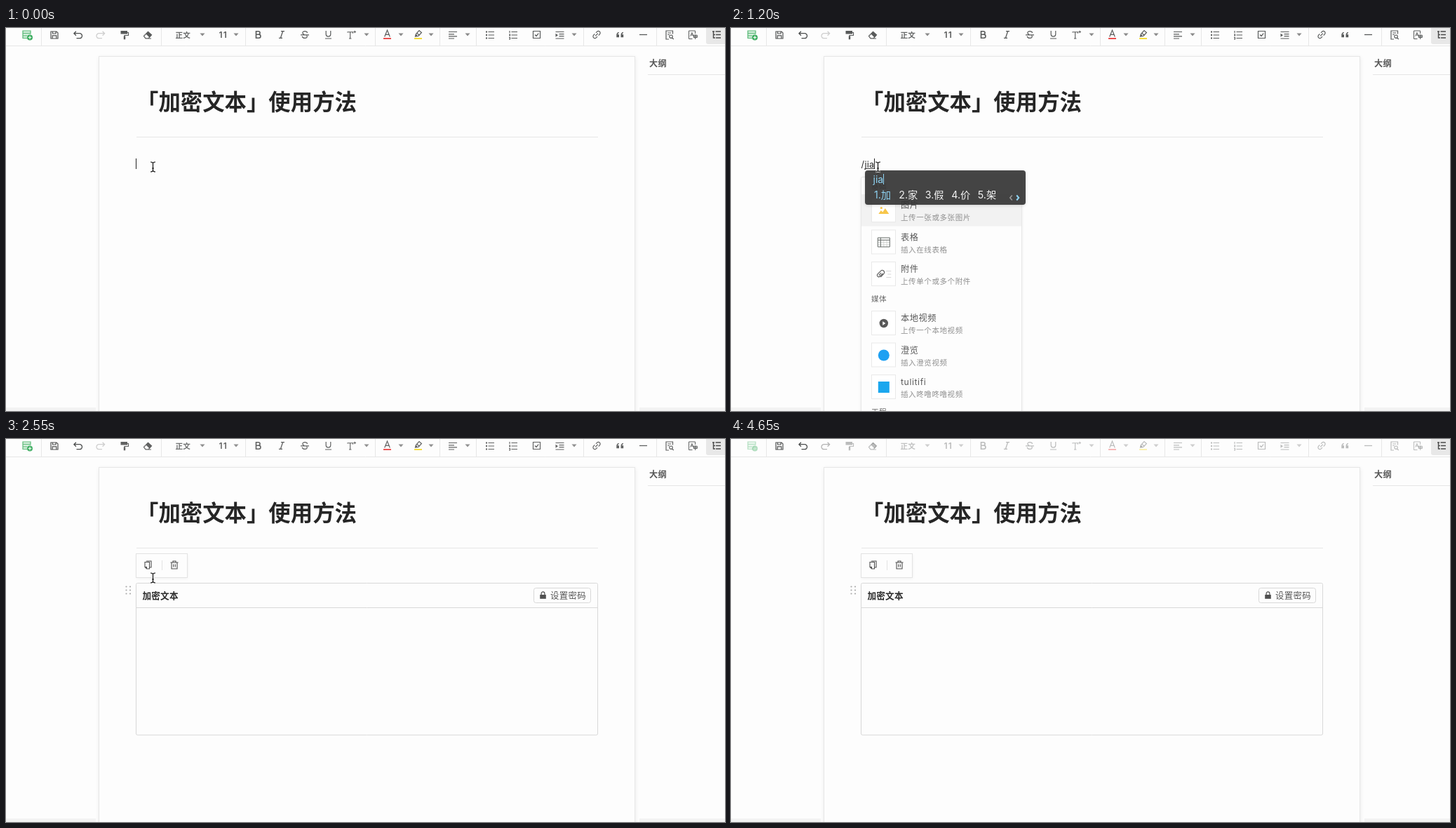
Animation of 1025 by 546 pixels, one loop 5250 ms. Source, as an HTML page with a canvas:

```html
<!DOCTYPE html>
<html lang="zh-CN">
<head>
<meta charset="utf-8">
<style>
html, body { margin: 0; width: 100%; height: 100%; overflow: hidden; background: #fdfdfd; }
canvas { display: block; width: 1025px; height: 546px; }
</style>
</head>
<body>
<canvas id="stage" width="1025" height="546"></canvas>
<script>
const ctx = document.getElementById('stage').getContext('2d');
const LOOP = 5250;
const FONT = 'Inter, "Noto Sans CJK SC", "Noto Sans CJK", sans-serif';
const INK = '#585a5a', PAPER = '#fdfdfd';

// Text placed by its left edge and the vertical centre of its em box.
function text(str, x, yc, size, color = INK, weight = 400, gap = 0) {
  ctx.font = `${weight} ${size}px ${FONT}`;
  ctx.letterSpacing = gap + 'px';
  ctx.fillStyle = color;
  ctx.fillText(str, x, yc + size * 0.38);
}

function line(x1, y1, x2, y2, color, width = 1) {
  ctx.strokeStyle = color;
  ctx.lineWidth = width;
  ctx.beginPath();
  ctx.moveTo(x1, y1);
  ctx.lineTo(x2, y2);
  ctx.stroke();
}

function rect(x, y, w, h, fill, color) {
  ctx.fillStyle = fill;
  ctx.fillRect(x, y, w, h);
  if (color) { ctx.strokeStyle = color; ctx.lineWidth = 1; ctx.strokeRect(x, y, w, h); }
}

function round(x, y, w, h, r, fill, color) {
  ctx.beginPath();
  ctx.roundRect(x, y, w, h, r);
  if (fill) { ctx.fillStyle = fill; ctx.fill(); }
  if (color) { ctx.strokeStyle = color; ctx.lineWidth = 1; ctx.stroke(); }
}

function shadowed(blur, dy, alpha, draw) {
  ctx.save();
  ctx.shadowColor = `rgba(0,0,0,${alpha})`;
  ctx.shadowBlur = blur;
  ctx.shadowOffsetY = dy;
  draw();
  ctx.restore();
}

function icon(x, y, stroke, fill = '', color = INK, width = 1.2) {
  ctx.save();
  ctx.translate(x, y);
  ctx.strokeStyle = ctx.fillStyle = color;
  ctx.lineWidth = width;
  if (stroke) ctx.stroke(new Path2D(stroke));
  if (fill) ctx.fill(new Path2D(fill));
  ctx.restore();
}

function dot(x, y, r, color) {
  ctx.fillStyle = color;
  ctx.beginPath();
  ctx.arc(x, y, r, 0, Math.PI * 2);
  ctx.fill();
}

function editTools() {
  // insert card
  icon(30, 9.5, 'M5-1v-4.5h-11v10.5h7M-6-2h11M-6 1.5h6', '', '#55b873');
  ctx.globalAlpha *= 0.25;
  rect(24, 4, 11, 10, '#55b873');
  ctx.globalAlpha *= 4;
  dot(34, 13.5, 4, '#3fae62');
  icon(34, 13.5, 'M-2.3 0h4.6M0-2.3v4.6', '', '#fff');

  icon(169, 10, 'M4-3.5h1.5v4h-5.5v2', 'M-5.5-6h9.5v4.5h-9.5zM-1.2 1.5h2.4v4.7h-2.4z');
  icon(202, 10, 'M-5.5 1.5l6-6.2 5 4.6-4.5 5h-4zM0 5h5', 'M-2.5-1.5l3-3.2 5 4.6-3 3.5z');
  text('正文', 241.5, 9.5, 10.6, '#666868', 600, 0.2);
  text('11', 303.5, 9.5, 12, INK, 600, 1.2);
  for (const x of [280, 328, 514, 563, 606, 658, 810])
    icon(x, 9.5, '', 'M-3.5-2h7l-3.5 4z', '#8a8a8a');

  icon(359.5, 9.5, 'M-3-4.7h3.3a2.2 2.2 0 0 1 0 4.5h-3.3zM-3-.2h4a2.4 2.4 0 0 1 0 4.9h-4z', '', INK, 1.6);
  icon(393, 9.5, 'M-1-4.8h5M-4 4.8h5M1.6-4.8l-3.2 9.6', '', INK, 1.3);
  icon(426, 9.5, 'M3.6-2.6c-.5-3-6.8-3-6.8 0c0 1.2 1 1.8 2.4 2.2M2.6 1.2c2 2-.4 4-2.6 3.7c-2 0-3.5-1-3.8-2.6M-6 .4h12');
  icon(459.5, 9, 'M-3.3-5v4.8a3.3 3.3 0 0 0 6.6 0v-4.8M-4.5 6h9');
  icon(491, 10, 'M-4-3.5v-.7h7.5v2M-.3-4v9M-2 5h3.4M4.5-4.5h3.4M6.2-6.2v3.4', '', INK, 1.1);
  icon(543.5, 8, 'M-3.8 4.5l3.8-9.5 3.8 9.5M-2.4 1.4h4.8');
  rect(538, 14, 11, 2, '#ea4f4f');
  icon(587.5, 8, 'M-4 4l1-3.5 4.5-5 3.4 3-4.5 5zM-2-1l3.6 3.3', 'M-4 4l1-3.3 3 3z');
  rect(582, 14, 11, 2, '#f5dc3c');

  icon(637, 10, 'M-6-4.5h12M-6-1.2h8M-6 1.8h12M-6 5h8');
  icon(690, 10, 'M-2.5-4.5h8.5M-2.5 0h8.5M-2.5 4.5h8.5', 'M-6-5.5h2v2h-2zM-6-1h2v2h-2zM-6 3.5h2v2h-2z');
  icon(723, 10, 'M-2.5-4.5h8.5M-2.5 0h8.5M-2.5 4.5h8.5M-5-6v3M-6-1h1.5v2h-1.5M-6 3.5h1.5v2.5h-1.5', '', INK, 1.1);
  icon(756.5, 9.5, 'M-5-5h10v10h-10zM-2.5 0l2 2 3.2-3.8');
  icon(789.5, 10, 'M-6-4.5h12M-1-1.3h7M-1 1.7h7M-6 5h12', 'M-6-2.3l3.5 2.5-3.5 2.5z');

  ctx.save();
  ctx.translate(842, 9.5);
  ctx.rotate(-Math.PI / 4);
  icon(0, 0, 'M-1.2-2.6h-2.3a2.6 2.6 0 0 0 0 5.2h2.3M1.2-2.6h2.3a2.6 2.6 0 0 1 0 5.2h-2.3M-2.6 0h5.2');
  ctx.restore();
  const quote = 'v-1c0-2.2 1.2-3.8 3.4-4.2v1.5c-1 .3-1.6 1-1.6 1.9h1.9v4h-3.7z';
  icon(875.5, 9.5, '', 'M-5.2 1.5' + quote + 'M1 1.5' + quote);
  icon(908.5, 9.5, 'M-5.5 0h11', '', INK, 1.3);
  icon(946, 10, 'M4.5-1.5v-4.5h-9.5v12h4M-2.7-3h5M-2.7-.5h2.5M4.2 2.2a2.2 2.2 0 1 1-4.4 0a2.2 2.2 0 1 1 4.4 0M3.7 4l2 2');
  icon(979, 10, 'M3.5-2v-4h-9v11.5h5M-3.3 1.5l2.2-5 2 5M-2.6 0h3M1 2h5.5M3.7-.5v6.5M1.3.2h5v3.4h-5z', '', INK, 1);
}

function toolbar(t) {
  line(0, 25.5, 1025, 25.5, '#e7e7e7');
  for (const x of [50.5, 221.5, 341.5, 526.5, 618.5, 670.5, 823.5, 927.5])
    line(x, 0, x, 25, '#e7e7e7');
  round(998, -4, 34, 27, 3, '#e8e8e8');
  icon(1013, 9.5, 'M-6-4.5h3M-1.5-4.5h7.5M-1 0h7M-1 4.5h7M-4.5-4.5v9h2.500M-4.5 0h2.500', '', '#4a4a4a', 1.4);
  icon(69, 10, 'M-5-5h8l2 2v8h-10zM-2.5-5v3h4.5v-3M-2.8 5v-4.2h5.6v4.2', '', '#505252');
  icon(102.5, 10, 'M-5.5-2.3h8a3.5 3.5 0 0 1 0 7h-4.5M-2.6-5.3l-3 3 3 3', '', '#4c4e4e', 1.3);
  icon(135, 10, 'M5.5-2.3h-8a3.5 3.5 0 0 0 0 7h4.5M2.6-5.3l3 3-3 3', '', t < 2700 ? '#cfcfcf' : '#b4b4b4', 1.3);
  ctx.save();
  ctx.globalAlpha = t < 2550 ? 1 : t < 2700 ? 0.95 : t < 2850 ? 0.5 : 0.4;
  editTools();
  ctx.restore();
}

function page() {
  rect(0, 0, 1025, 546, PAPER);
  rect(0, 541, 128, 5, '#f3f3f3');
  rect(903, 541, 122, 5, '#f3f3f3');
  shadowed(6, 1, 0.09, () => rect(132.5, 40.5, 764, 520, PAPER));
  rect(132.5, 40.5, 764, 520, PAPER, '#e7e7e7');
  text('「加密文本」使用方法', 186, 105.5, 31.4, '#262626', 700);
  line(186, 155.5, 844, 155.5, '#e6e6e6');
  text('大纲', 917, 50, 12.2, '#555', 600, 0.4);
  line(915, 66.5, 1025, 66.5, '#e6e6e6');
}

const art = {
  photo(x, y) {
    icon(x, y, '', 'M-7.500 5l3.500-5 2.500 2.500 3.500-5.500 5.500 8z', '#f7c64a');
    dot(x - 3.5, y - 3.5, 1.6, '#f7c64a');
  },
  table(x, y) {
    icon(x, y, 'M-4.5-3v9.5M-8.500 0h17M-8.500 3.300h17M0-3v9.5M4.300-3v9.5', '', '#cbcecb', 0.8);
    icon(x, y, 'M-8.5-6.5h17v13h-17zM-8.5-3.2h17M-4.5-6.5v13', '', '#656a67', 1);
  },
  clip(x, y) {
    icon(x - 5, y, 'M3.500-1l-4 4a2.200 2.200 0 0 1-3.300-3.200l4.500-4.400a2.900 2.900 0 0 1 4.300 4l-4.500 4.700M1.200-1.800l-3.300 3.500', '', '#555', 1.1);
    icon(x + 6.5, y, 'M-3-4.5h7M-1 0h5M-3 4.5h7', '', '#d6d6d6', 1);
  },
  play(x, y) {
    dot(x, y, 6.2, '#595959');
    icon(x, y, '', 'M-1.6-2.7l4.2 2.7-4.2 2.7z', '#fff');
  },
  disc(x, y) { dot(x, y, 8, '#1ea0f2'); },
  block(x, y) { rect(x - 8, y - 8, 16, 16, '#1ba7ee'); },
  shield(x, y) {
    icon(x, y, 'M0-9l7.5 2.5v6c0 4.5-3.5 7.5-7.5 9.3c-4-1.8-7.5-4.8-7.5-9.3v-6zM-1.7-1v-1.3a1.7 1.7 0 0 1 3.4 0v1.3', '', '#666', 1.1);
    round(x - 3, y - 1, 6, 4.5, 0.8, '#a0a0a0');
  }
};

function item(y, name, note, draw, active) {
  if (active) rect(186, y, 228, 45.5, '#f2f2f2');
  rect(200.5, y + 5.5, 34, 34, '#fff', '#e9e9e9');
  draw(217.8, y + 23);
  text(name, 242, y + 15.5, 12.2, '#585858', 400, 0.6);
  text(note, 242, y + 33.5, 10.5, '#8f8f8f', 400, 0.6);
}

function panel(h) {
  shadowed(5, 1, 0.1, () => round(186, 212.5, 228, h, 2, PAPER));
  round(185.5, 212.5, 229, h, 2, PAPER, '#e7e7e7');
}

function menu() {
  panel(350);
  const head = (s, y) => text(s, 200, y, 10.6, '#666', 400, 0.4);
  head('基础', 225);
  item(237, '图片', '上传一张或多张图片', art.photo, true);
  item(282.5, '表格', '插入在线表格', art.table);
  item(328, '附件', '上传单个或多个附件', art.clip);
  head('媒体', 386);
  item(398, '本地视频', '上传一个本地视频', art.play);
  item(443.5, '澄览', '插入澄览视频', art.disc);
  item(489, 'tulitifi', '插入咚噜咚噜视频', art.block);
  head('工程', 546.5);
}

function ime(typed, words, pitch, right) {
  shadowed(4, 1, 0.15, () => round(191, 203, right - 191, 49, 4, 'rgba(53,53,53,.9)'));
  text(typed, 202.5, 216, 14, '#8ed3f3');
  const end = 202.5 + ctx.measureText(typed).width;
  rect(Math.round(end), 208, 1, 15, '#8ed3f3');
  words.forEach((w, i) => {
    const x = i ? 252.5 + pitch - 50.7 + (i - 1) * pitch : 204;
    text(`${i + 1}.${w}`, x, 238, 14.2, i ? '#f4f4f4' : '#8ed3f3');
  });
  icon(right - 21, 242, 'M1.8-3.5l-3 3.5 3 3.5', '', '#999', 1.6);
  icon(right - 11, 242, 'M-1.8-3.5l3 3.5-3 3.5', '', '#8ed3f3', 2);
}

function caret(x) { rect(x, 186, 1, 15, '#222'); }

function typing(t) {
  const body = (s, x) => text(s, x, 194.5, 12.6, '#262626', 400, 0.2);
  if (t < 150) return caret(185);
  if (t < 1650) menu();
  else {
    panel(46.5);
    item(212.5, '加密文本', '需要密码才可查看', art.shield, true);
  }
  body('/', 185.5);
  if (t < 1050) {
    if (t < 750) caret(190);
  } else if (t < 1500) {
    const raw = t < 1200 ? 'j' : t < 1350 ? 'jia' : "jia'm";
    const end = t < 1200 ? 193 : t < 1350 ? 204 : 218;
    body(raw, 190.5);
    line(190.5, 200.5, end, 200.5, '#444');
    caret(end);
  } else {
    body('加密', 190.5);
    if (t < 2100) caret(216);
  }
  if (t >= 1200 && t < 1350) ime('jia', ['加', '家', '假', '价', '架'], 37.5, 420);
  else if (t >= 1350 && t < 1500) ime("jia'm", ['加盟', '加密', '加码', '价目', '家门'], 50.7, 481);
  else if (t >= 1500 && t < 1650) ime("jia'mi", ['加密', '甲米', '甲醚', '加米', '荚蒾'], 50.7, 481);
}

function card() {
  shadowed(4, 1, 0.06, () => rect(185.5, 163.5, 73, 34, PAPER));
  rect(185.5, 163.5, 73, 34, PAPER, '#e3e3e3');
  icon(202.5, 179.5, 'M-2.5-5.5h7v9h-2M-4.5-4h6.5v9.5h-4l-2.5-2.5zM-4.5 3h2.5v2.5', '', '#4f4f4f', 1.1);
  line(222.5, 173, 222.5, 187, '#e3e3e3');
  icon(240, 179.5, 'M-5.5-3.5h11M-2-3.5v-2h4v2M-4-3.5v9h8v-9M-1.3-1v4M1.3-1v4', '', '#4f4f4f', 1.1);
  for (let i = 0; i < 6; i++) dot(171.5 + (i % 2) * 5.5, 210.5 + (i >> 1) * 5, 1.1, '#aaa');

  round(185.5, 205.5, 658, 216.5, 2, PAPER, '#d8d8d8');
  line(186, 240.5, 843, 240.5, '#d8d8d8');
  text('加密文本', 194.5, 223, 12.6, '#2a2a2a', 700, 0.2);
  round(752.5, 212.5, 81, 21, 3, PAPER, '#d8d8d8');
  icon(765.5, 223, 'M-2.4-1v-1.7a2.4 2.4 0 0 1 4.8 0v1.7', 'M-4.3-1h8.6v5.8h-8.6z', '#505050');
  text('设置密码', 776, 223, 12.4, '#555', 400, 0.4);
}

// start time, x, y of each pointer stop
const stops = [
  [0, 209.5, 198], [3450, 210.5, 197.5], [3600, 281.5, 218], [3750, 529, 255.5],
  [3900, 623, 277], [4050, 703, 318], [4200, 834.5, 465], [4350, 922, 508], [4500, 993, 505]
];

function pointer(t) {
  if (t >= 4650) return;
  const [, x, y] = stops.findLast(s => t >= s[0]);
  if (x > 897) {
    const arrow = 'M.5.5v13l3-2.8 2 4.3 2-.9-2-4.2h4.5z';
    icon(x, y, arrow, '', '#fff', 2);
    icon(x, y, '', arrow, '#111');
  } else {
    const beam = 'M-3.5-7c2 0 3.5.5 3.5 2v10c0 1.5-1.5 2-3.5 2M3.5-7c-2 0-3.5.5-3.5 2M0 5c0 1.5 1.5 2 3.5 2M-1.5 2h3';
    icon(x, y, beam, '', '#fff', 2.6);
    icon(x, y, beam, '', '#111', 1.2);
  }
}

function draw(t) {
  page();
  toolbar(t);
  if (t < 2550) typing(t); else card();
  pointer(t);
}

const start = performance.now();
function tick() {
  draw((performance.now() - start) % LOOP);
  requestAnimationFrame(tick);
}
tick();
</script>
</body>
</html>
```
